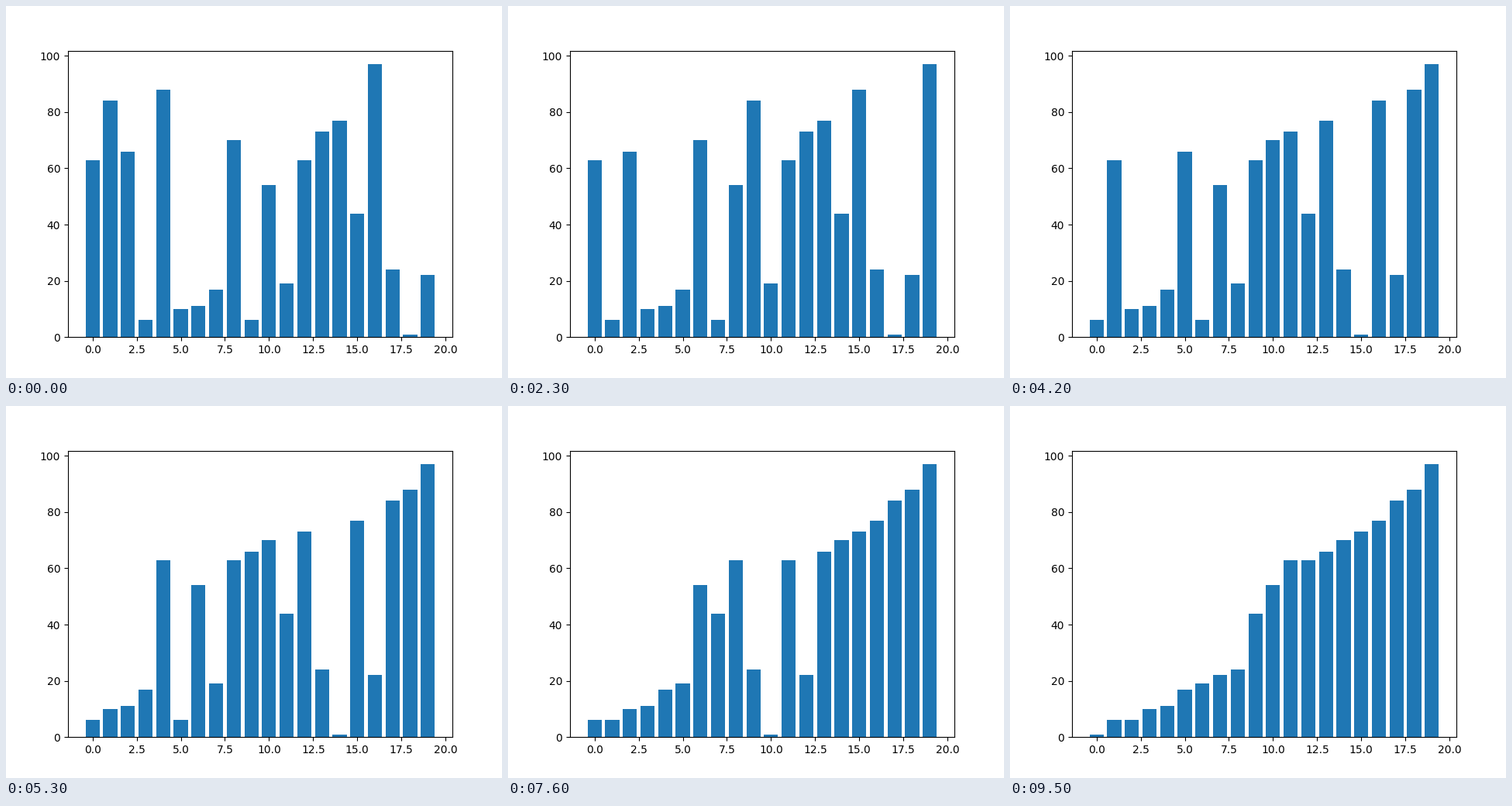
Write a matplotlib script that moves like this. It is 640 px wide and 480 px high and loops after 9600 ms.

```python
import matplotlib.pyplot as plt
from matplotlib.animation import FuncAnimation

VALUES = [63, 84, 66, 6, 88, 10, 11, 17, 70, 6,
          54, 19, 63, 73, 77, 44, 97, 24, 1, 22]
STEP_MS = 100


def bubble_sort_states(values):
    """Return the list before sorting and after every single swap."""
    items = list(values)
    states = [items.copy()]
    for end in range(len(items) - 1, 0, -1):
        for i in range(end):
            if items[i] > items[i + 1]:
                items[i], items[i + 1] = items[i + 1], items[i]
                states.append(items.copy())
    return states


states = bubble_sort_states(VALUES)

plt.rcParams["font.family"] = "DejaVu Sans"
fig, ax = plt.subplots(figsize=(6.4, 4.8), dpi=100)
bars = ax.bar(range(len(VALUES)), VALUES, color="#1f77b4")


def draw(frame):
    for bar, height in zip(bars, states[frame]):
        bar.set_height(height)
    return list(bars)


def reset():
    return draw(0)


anim = FuncAnimation(fig, draw, frames=len(states), init_func=reset,
                     interval=STEP_MS, repeat=True, repeat_delay=0)
plt.show()
```
